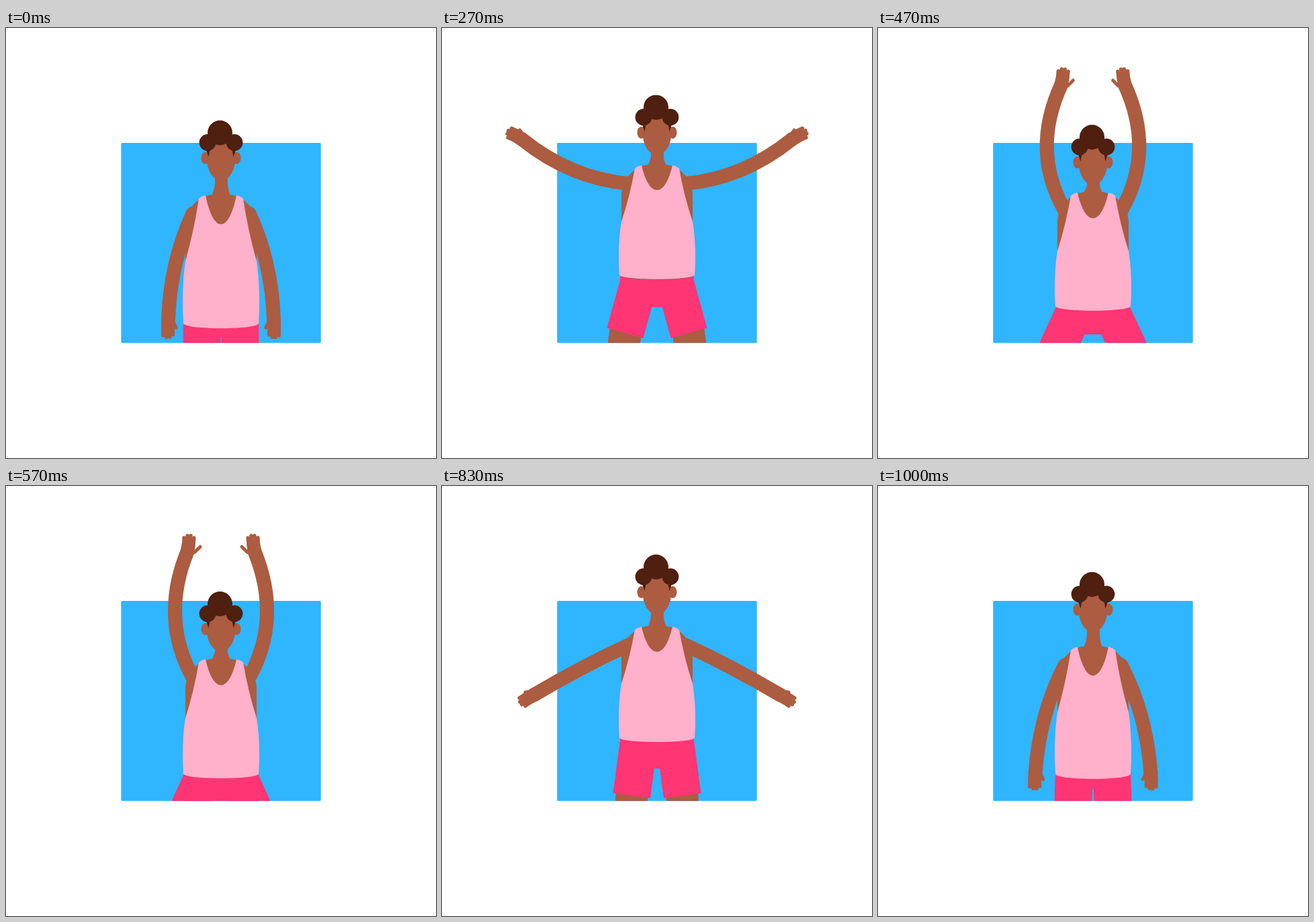
An HTML page with a canvas that plays this animation: 640 px wide and 640 px high, repeating every 1.03 s.

```html
<!DOCTYPE html>
<html lang="en">
<head>
<meta charset="utf-8">
<title>Jumping jack</title>
<style>
  html, body { margin: 0; height: 100%; overflow: hidden; background: #fff; }
  canvas { display: block; }
</style>
</head>
<body>
<canvas id="stage" width="640" height="640"></canvas>
<script>
const ctx = document.getElementById('stage').getContext('2d');
const SKY = '#30b5ff', SKIN = '#ac5c40', SHIRT = '#ffb0ca', SHORTS = '#ff3574', HAIR = '#4f1f10';
const LOOP = 1030, STEPS = 26, RAD = Math.PI / 180;

// Height of the shoulders: step, y
const lift = [
  [0, 249], [1, 255], [4, 215], [6.4, 203], [9, 219.5], [12, 245],
  [14, 258], [17, 218], [19.3, 203], [21, 209.5], [25, 239.5]
];

// step, head gap, shirt stretch, leg angle, arm angle, arm length, arm bow, hand angle, thumb
const poses = [
  [0, 111.5, 1, 0.8, 12.8, 165, 17, 1, 12],
  [4, 109, 0.874, 6.4, 53.4, 162.6, 0, 48, -9],
  [9, 102.5, 0.859, 20.7, 148.1, 179.7, -41, 159, -10],
  [14, 101, 0.894, 24.5, 177.6, 188, -45, 187, -18],
  [17, 102.5, 0.851, 17.8, 132.1, 176, -27, 144, -10],
  [21, 107.5, 0.866, 7.6, 62.2, 159.5, 4, 59, -10],
  [25, 111.5, 0.992, 1.6, 15.3, 166.4, 17, 2.5, 12]
];

const torso = new Path2D('M306 -1L297 1Q288 4 279 14C271 22 267 32 267 45V175H373V45' +
  'C373 32 369 22 361 14Q352 4 343 1L334 -1Z');
const pelvis = new Path2D('M265 164.5C270 168.5 295 170 320 170S370 168.5 375 164.5V211H265Z');
const shirt = new Path2D('M287 5Q291 1 297 0C302 25 310 43 320 43S338 25 343 0Q349 1 353 5' +
  'Q360 52 373 98C377 125 378 160 376 191C372 196 345 198 320 198S268 196 264 191' +
  'C262 160 263 125 267 98Q280 52 287 5Z');
const sideburns = new Path2D('M297 41L304 41L301.5 54.5ZM343 41L336 41L338.5 54.5Z');

// Smooth periodic curve through one column of keys
function track(keys, col, m) {
  const n = keys.length;
  const key = i => {
    const k = keys[(i + n) % n];
    return [k[0] + STEPS * Math.floor(i / n), k[col]];
  };
  const slope = (p, q, r) => {
    const g = q[0] - p[0], h = r[0] - q[0];
    return ((q[1] - p[1]) / g * h + (r[1] - q[1]) / h * g) / (g + h);
  };
  let i = n - 1;
  while (keys[i][0] > m) i--;
  const [a, b, c, d] = [key(i - 1), key(i), key(i + 1), key(i + 2)];
  const h = c[0] - b[0], u = (m - b[0]) / h, v = 1 - u;
  return v * v * (1 + 2 * u) * b[1] + u * u * (3 - 2 * u) * c[1] +
    h * u * v * (v * slope(a, b, c) - u * slope(b, c, d));
}

function fill(color, path) {
  ctx.fillStyle = color;
  ctx.fill(path);
}

function oval(color, x, y, rx, ry = rx) {
  ctx.fillStyle = color;
  ctx.beginPath();
  ctx.ellipse(x, y, rx, ry, 0, 0, 7);
  ctx.fill();
}

function box(color, x, y, w, h) {
  ctx.fillStyle = color;
  ctx.fillRect(x, y, w, h);
}

function line(width, x1, y1, x2, y2) {
  ctx.lineWidth = width;
  ctx.beginPath();
  ctx.moveTo(x1, y1);
  ctx.lineTo(x2, y2);
  ctx.stroke();
}

function group(x, y, draw) {
  ctx.save();
  ctx.translate(x, y);
  draw();
  ctx.restore();
}

function bothSides(draw) {
  draw();
  group(640, 0, () => {
    ctx.scale(-1, 1);
    draw();
  });
}

function drawHand(thumb) {
  fill(SKIN, new Path2D('M-10.5 -2H10.5L9.5 13Q0 17 -10 13Z'));
  line(5.5, -7.5, 8, -7.2, 21);
  line(5.5, -2.5, 8, -2, 23.5);
  line(5.5, 2.5, 8, 2.8, 23);
  line(5.5, 6.5, 8, 7.5, 19.5);
  line(5, thumb * 0.6, 0, thumb, 9);
}

function drawArm(angle, length, bow, hand, thumb) {
  const sin = Math.sin(angle * RAD), cos = Math.cos(angle * RAD);
  const x = 278, y = 27, mid = length * 0.48;
  const wx = x - length * sin, wy = y + length * cos;
  ctx.strokeStyle = SKIN;
  ctx.lineCap = 'round';
  ctx.lineWidth = 21;
  ctx.beginPath();
  ctx.moveTo(x, y);
  ctx.quadraticCurveTo(x - mid * sin - bow * cos, y + mid * cos - bow * sin, wx, wy);
  ctx.stroke();
  group(wx, wy, () => {
    ctx.rotate(hand * RAD);
    drawHand(thumb);
  });
}

function drawLeg(angle) {
  group(292, 178.4, () => {
    ctx.rotate(angle * RAD);
    group(0, 70, () => {
      ctx.rotate(-angle / 2 * RAD);
      box(SKIN, -24, -8, 48, 80);
    });
    box(SHORTS, -28, -4, 56, 77.6);
  });
}

function drawHead() {
  oval(SKIN, 296.5, 56, 6, 9);
  oval(SKIN, 343.5, 56, 6, 9);
  oval(SKIN, 320, 55.5, 21.5, 34);
  fill(HAIR, sideburns);
  oval(HAIR, 300, 33, 12.4);
  oval(HAIR, 340, 33, 12.4);
  oval(HAIR, 318.5, 18.5, 18.5);
}

function draw(m) {
  const y = track(lift, 1, m);
  const [gap, stretch, leg, ...arm] = poses[0].slice(1).map((_, i) => track(poses, i + 1, m));

  box('#fff', 0, 0, 640, 640);
  ctx.fillStyle = SKY;
  ctx.beginPath();
  ctx.roundRect(171.3, 171, 297.4, 297.7, 1.5);
  ctx.fill();

  group(0, y, () => {
    bothSides(() => drawArm(...arm));
    fill(SKIN, torso);
    const top = 80 - gap;
    fill(SKIN, new Path2D(`M311 ${top}V${top + 10}Q311 -10 306 1H334Q329.5 -10 330 ${top + 10}V${top}Z`));
  });

  // The floor hides everything below the square
  ctx.save();
  ctx.beginPath();
  ctx.rect(0, 0, 640, 468.7);
  ctx.clip();
  group(0, y, () => {
    bothSides(() => drawLeg(leg));
    fill(SHORTS, pelvis);
  });
  ctx.restore();

  group(0, y, () => {
    ctx.scale(1, stretch);
    fill(SHIRT, shirt);
  });
  group(0, y - gap, drawHead);
}

// 25 drawings a second shown at 30: every sixth one is held twice
function tick() {
  const shown = Math.floor((performance.now() % LOOP + 3.4) * 0.03);
  draw(Math.min(shown - Math.floor((shown + 3) / 6), STEPS - 1));
  requestAnimationFrame(tick);
}
tick();
</script>
</body>
</html>
```
